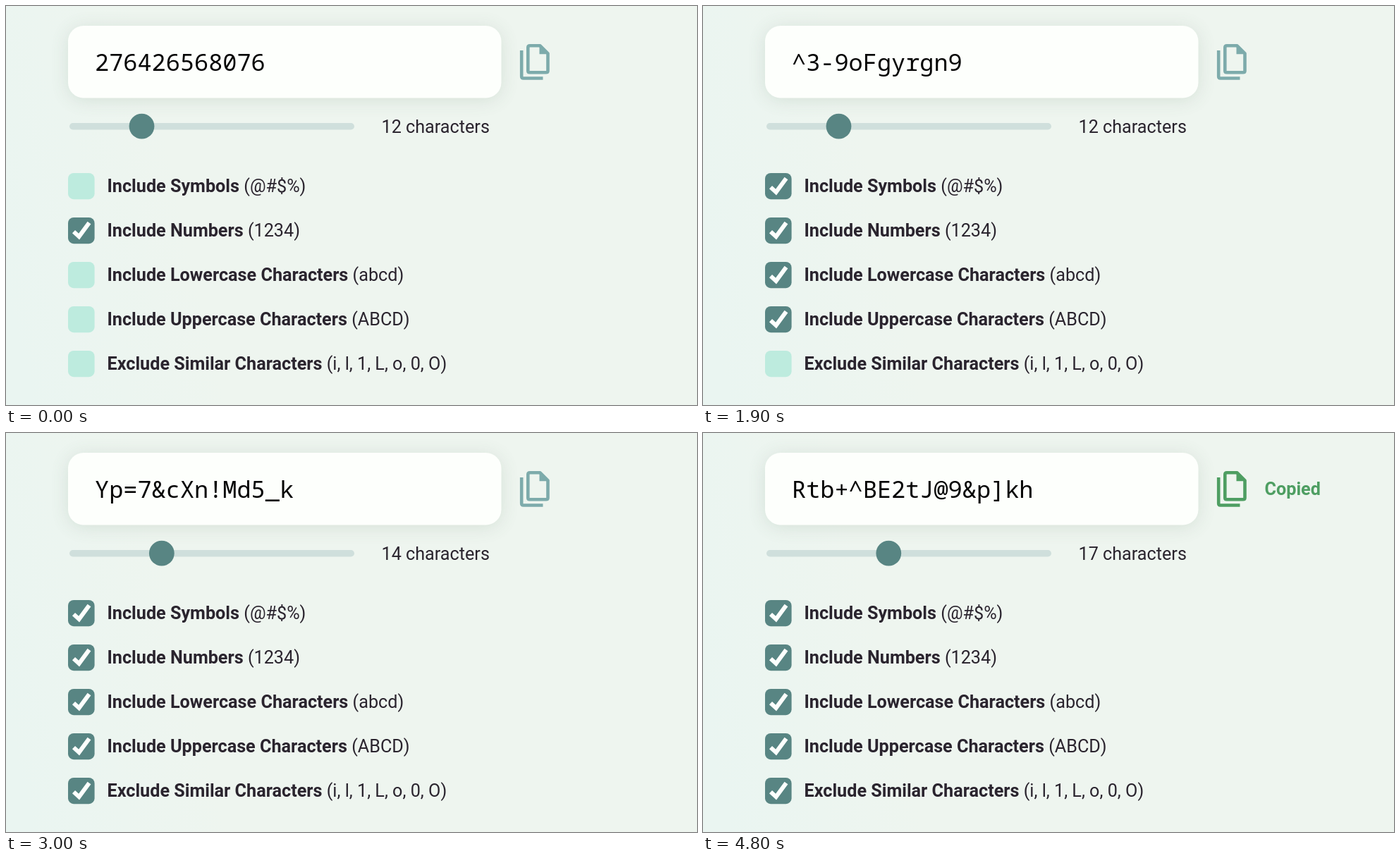
These frames come from a looping animation (980x566 px, 5.3 s). An HTML page with a canvas:

```html
<!DOCTYPE html>
<html lang="en">
<head>
<meta charset="utf-8">
<title>Password generator</title>
<style>
  html, body { margin: 0; width: 100%; height: 100%; overflow: hidden; background: #eef5ef; }
  canvas { display: block; }
</style>
</head>
<body>
<canvas id="stage" width="980" height="566"></canvas>
<script>
const ctx = document.getElementById('stage').getContext('2d');
const LOOP = 5300;
const TEAL = [88, 133, 131], MINT = [189, 235, 222];
const ICON = [125, 171, 171], GREEN = [78, 158, 98];
const INK = '#2a242e';
const SANS = 'Roboto, sans-serif';
const MONO = '"Roboto Mono", "Noto Sans Mono", monospace';

const options = [
  { label: 'Include Symbols', hint: '(@#$%)', on: 600, fade: 200 },
  { label: 'Include Numbers', hint: '(1234)', on: -1000, fade: 100 },
  { label: 'Include Lowercase Characters', hint: '(abcd)', on: 1100, fade: 200 },
  { label: 'Include Uppercase Characters', hint: '(ABCD)', on: 1500, fade: 100 },
  { label: 'Exclude Similar Characters', hint: '(i, l, 1, L, o, 0, O)', on: 2000, fade: 200 },
];

const passwords = [
  [0, '276426568076'],
  [600, '%4.>;0=_)!6%'],
  [1100, '7k;q(2x)fw!e'],
  [1500, '^3-9oFgyrgn9'],
  [2000, 'N#GnNhn*rjVV'],
  [2900, 'e?K8w+TzR(4hd'],
  [3000, 'Yp=7&cXn!Md5_k'],
  [3100, 'hS>w3*Zfq@8V-tb'],
  [3300, 'MA/6?.Gun<>uQBe*'],
  [3500, 'Rtb+^BE2tJ@9&p]kh'],
];

const clamp = v => Math.max(0, Math.min(1, v));
const mix = (a, b, k) => `rgb(${a.map((v, i) => Math.round(v + (b[i] - v) * k))})`;
// The interface repaints ten times a second.
const progress = (t, start, length) => clamp((Math.floor(t / 100) * 100 - start + 100) / length);

function text(str, x, y, font, color = INK) {
  ctx.font = font;
  ctx.fillStyle = color;
  ctx.fillText(str, x, y);
  return ctx.measureText(str).width;
}

function box(x, y, w, h, r, color) {
  ctx.fillStyle = color;
  ctx.beginPath();
  ctx.roundRect(x, y, w, h, r);
  ctx.fill();
}

function drawBackground() {
  const g = ctx.createLinearGradient(0, 400, 260, 340);
  g.addColorStop(0, '#eaf5f1');
  g.addColorStop(1, '#eef5ef');
  ctx.fillStyle = g;
  ctx.fillRect(0, 0, 980, 566);
}

function drawCard(password) {
  ctx.save();
  ctx.shadowColor = 'rgba(80, 110, 90, 0.16)';
  ctx.shadowBlur = 26;
  ctx.shadowOffsetY = 3;
  box(88, 28, 614.5, 102.5, 22, '#fdfffc');
  ctx.restore();
  text(password, 126, 92.3, `33.6px ${MONO}`, '#050505');
}

function drawSlider(count) {
  box(90, 166, 404, 9.5, 4.75, '#cfdfdc');
  ctx.fillStyle = mix(TEAL, TEAL, 0);
  ctx.beginPath();
  ctx.arc(192.5 + (count - 12) * 14.16, 170.6, 17.9, 0, Math.PI * 2);
  ctx.fill();
  text(`${count} characters`, 532.5, 179.6, `25.2px ${SANS}`);
}

function drawOption({ label, hint, on, fade }, y, t) {
  const k = progress(t, on, fade);
  box(88, y - 18.5, 37.6, 37.2, 8, mix(MINT, TEAL, k));
  if (k > 0) {
    ctx.save();
    ctx.globalAlpha = k;
    ctx.translate(106.8, y);
    ctx.strokeStyle = '#fdfffd';
    ctx.lineWidth = 6;
    ctx.lineJoin = 'miter';
    ctx.beginPath();
    ctx.moveTo(-10.8, 1.6);
    ctx.lineTo(-3.2, 8.6);
    ctx.lineTo(11.2, -11);
    ctx.stroke();
    ctx.restore();
  }
  const width = text(label + ' ', 143.5, y + 8.2, `bold 25.2px ${SANS}`);
  text(hint, 143.5 + width, y + 8.2, `25.2px ${SANS}`);
}

function drawCopyButton(k) {
  const color = mix(ICON, GREEN, k);
  ctx.strokeStyle = ctx.fillStyle = color;
  ctx.lineWidth = 4.6;
  ctx.lineJoin = 'round';
  ctx.stroke(new Path2D('M743 56.3H757.5L768.5 67.3V92Q768.5 94.3 766 94.3H742.5Q740.3 94.3 740.3 92V58.8Q740.3 56.3 743 56.3Z'));
  ctx.stroke(new Path2D('M731.2 63V100Q731.2 102.5 733.7 102.5H761.5'));
  ctx.fill(new Path2D('M756.5 56V68.3H769Z'));
  if (k > 0) {
    ctx.globalAlpha = k;
    text('Copied', 796.5, 88, `bold 25.2px ${SANS}`, mix(GREEN, GREEN, 0));
    ctx.globalAlpha = 1;
  }
}

function draw(t) {
  const password = passwords.findLast(([start]) => t >= start)[1];
  drawBackground();
  drawCard(password);
  drawSlider(password.length);
  options.forEach((option, i) => drawOption(option, 255.5 + i * 63, t));
  drawCopyButton(progress(t, 4300, 200));
}

const start = performance.now();
function frame() {
  draw((performance.now() - start) % LOOP);
  requestAnimationFrame(frame);
}
frame();
</script>
</body>
</html>
```
